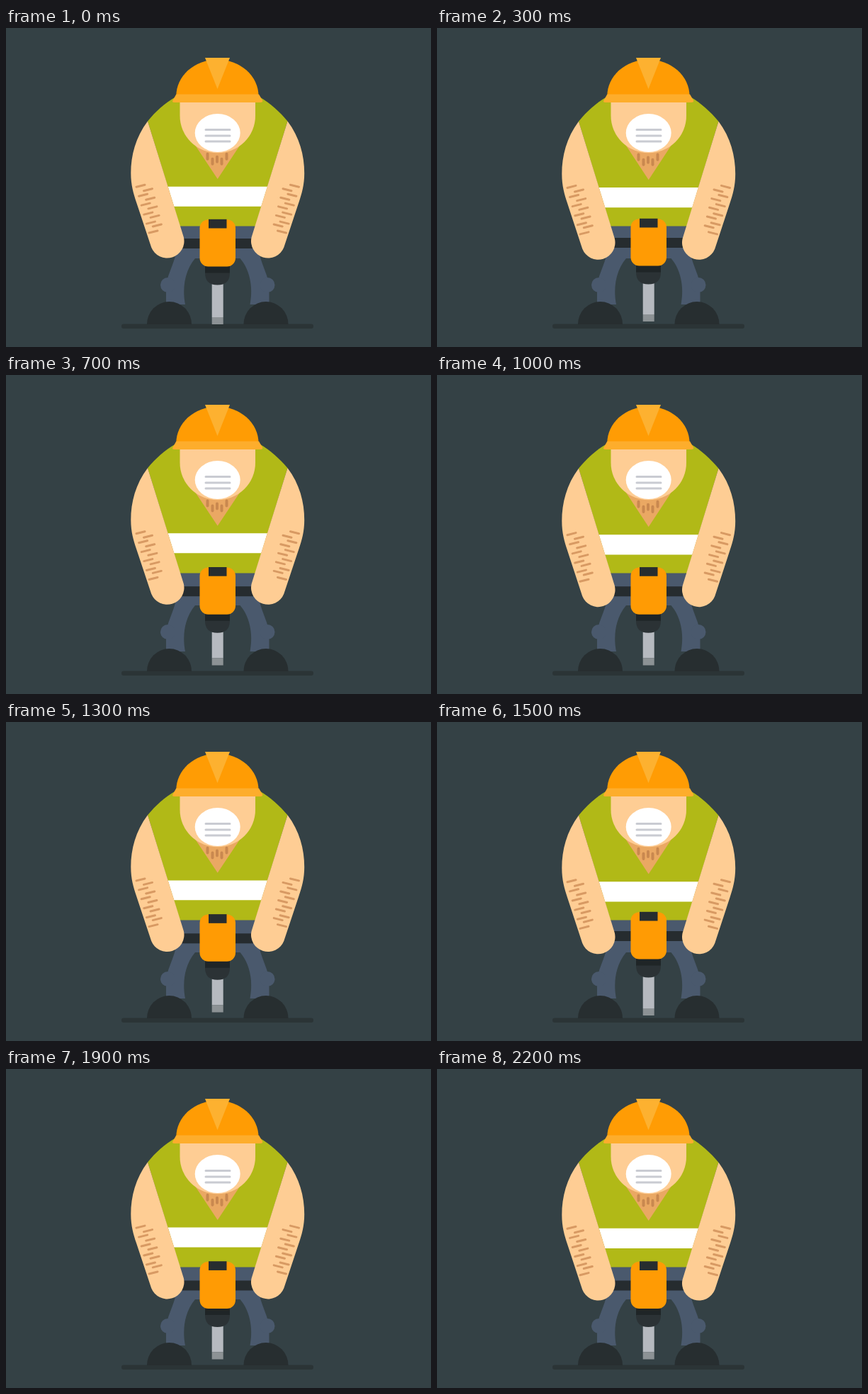
Animation of 600 by 450 pixels, one loop 2300 ms. Source, as an HTML page:

```html
<!DOCTYPE html>
<html>
<head>
<meta charset="utf-8">
<style>
html, body { margin: 0; width: 100%; height: 100%; overflow: hidden; background: #344145; }
svg { display: block; width: 600px; height: 450px; }
.line { fill: none; stroke-linecap: round; stroke-width: 3; }
</style>
</head>
<body>
<svg viewBox="0 0 600 450">
  <defs>
    <clipPath id="waist"><path d="M0 0H600V279.5H0z"/></clipPath>
    <g id="leg" fill="#4a596d">
      <path d="M246 279H299V325H267C254 340 248 364 253 390H226V365C227 350 235 338 240 318z"/>
      <circle cx="228.5" cy="362.5" r="10.5"/>
    </g>
    <path id="shoe" d="M199 418a31.5 32 0 0 1 63 0z" fill="#272e30"/>
    <g id="arm">
      <path d="M200 131.5C183 154 176.3 180 176.3 205C176.3 222 180 234 184 246L205.2 310A24 24 0 0 0 250.9 295.8z" fill="#fecd94"/>
      <path id="hairs" class="line" stroke="#d89a63"/>
    </g>
  </defs>

  <rect x="163" y="417.5" width="271" height="6.5" rx="3" fill="#2b3436"/>
  <use href="#leg"/><use href="#leg" transform="matrix(-1 0 0 1 597.5 0)"/>
  <use href="#shoe"/><use href="#shoe" transform="matrix(-1 0 0 1 597.5 0)"/>

  <g clip-path="url(#waist)">
    <g class="body">
      <path d="M200 131.5C211 118 224 106 240 97H357.5C373 106 386 118 397.5 131.5L350.5 285H247z" fill="#b1b917"/>
      <path d="M228.6 224H369L360.3 252H237.3z" fill="#fff"/>
      <path d="M264.7 162H332.7L298.7 213.3z" fill="#eaa863"/>
      <path d="M284.5 178v7M291.5 185v7M298 182v7M304.5 185v7M311.5 178v7" class="line" stroke="#c9884f" style="stroke-width:4"/>
    </g>
  </g>

  <g id="bit">
    <rect x="290.7" y="340" width="16" height="68" fill="#b6bac0"/>
    <rect x="290.7" y="408" width="16" height="10" fill="#8c9295"/>
  </g>
  <g id="drill">
    <rect x="245" y="297" width="108" height="14" fill="#262c2f"/>
    <path d="M281 334H316V346H281z" fill="#1f2527"/>
    <path d="M281 345.5H316Q316 362.5 298.5 362.5T281 345.5z" fill="#2b3235"/>
    <rect x="273.5" y="270.2" width="50.5" height="66.3" rx="12" fill="#ff9b04"/>
    <rect x="286" y="269.8" width="25.5" height="12.7" fill="#272d2f"/>
  </g>
  <g class="body"><use href="#arm"/><use href="#arm" transform="matrix(-1 0 0 1 597.5 0)"/></g>

  <path d="M245.5 100V124A53 52 0 0 0 352 124V100z" fill="#fecd94"/>
  <ellipse cx="298.7" cy="148" rx="32" ry="27" fill="#fff"/>
  <path d="M282 143.5H316M282 152H316M282 160H316" class="line" stroke="#c9cbd2"/>
  <path d="M240.3 96A58.1 51.5 0 0 1 356.5 96z" fill="#ff9c04"/>
  <path d="M240.3 93.5H357L362 102Q363 105 359 105H238Q234 105 235.5 102z" fill="#fdad2c"/>
  <path d="M281 42H316L298.5 86z" fill="#fdb130"/>
</svg>
<script>
const $ = id => document.getElementById(id);
const shift = (el, y) => el.setAttribute('transform', `translate(0 ${y})`);

// two staggered columns of arm hair
let hairs = '';
for (let i = 0; i < 6; i++) {
  hairs += `M${184 + 3.6 * i} ${224.5 + 13 * i}l12 -3`;
  if (i < 5) hairs += `M${194.5 + 3.2 * i} ${230 + 12.6 * i}l12 -3`;
}
$('hairs').setAttribute('d', hairs);

// linear interpolation through [phase, value] keys
function track(keys, p) {
  const i = keys.findIndex(k => k[0] > p);
  const [a, u] = keys[i - 1], [b, v] = keys[i];
  return u + (v - u) * (p - a) / (b - a);
}
const drillKeys = [[0, 0], [.043, -1], [.22, -2], [.43, 1.2], [.65, 1.5], [1, 0]];
const bitKeys = [[0, 0], [.043, -4], [.25, -4], [.4, -8.5], [.66, -8.5], [.83, -1], [.9, 0], [1, 0]];
const neckY = 95;

function draw(now) {
  const t = Math.floor(now % 2300 / 100) / 23;  // ten poses per second
  const beat = t * 8 % 1;
  // the torso and arms stretch down from the neck
  const stretch = 1 + (.3 + 1.2 * Math.cos(2 * Math.PI * (t * 4 - .66))) / 150;
  document.querySelectorAll('.body').forEach(el =>
    el.setAttribute('transform', `matrix(1 0 0 ${stretch} 0 ${neckY * (1 - stretch)})`));
  shift($('drill'), track(drillKeys, beat));
  shift($('bit'), track(bitKeys, beat));
}
const start = performance.now();
function loop() {
  draw(performance.now() - start);
  requestAnimationFrame(loop);
}
loop();
</script>
</body>
</html>
```
